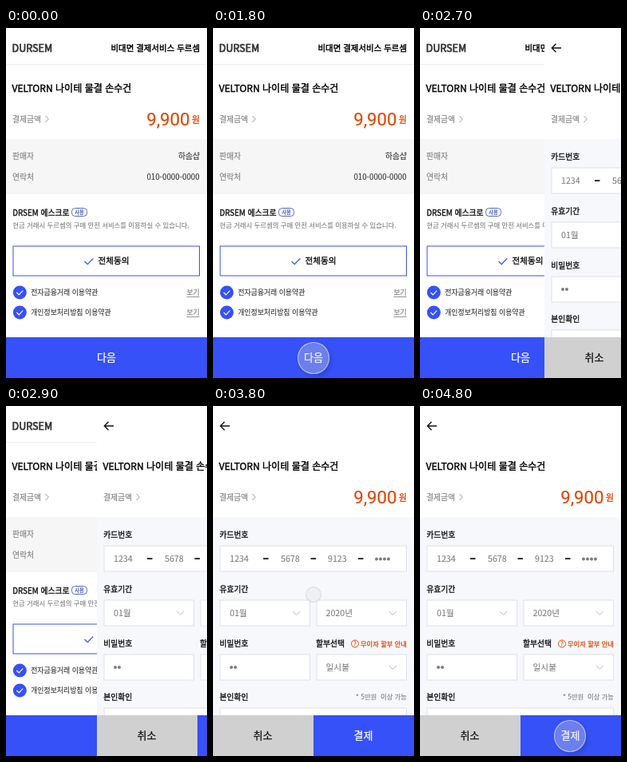
These frames come from a looping animation (252 px wide and 438 px high, 6.3 s). An HTML page:

```html
<!DOCTYPE html>
<html lang="ko">
<head>
<meta charset="utf-8">
<title>결제</title>
<style>
html, body { margin: 0; width: 100%; height: 100%; overflow: hidden; background: #fff; }
svg { display: block; position: absolute; left: 0; top: 0; }
text { font-family: "Noto Sans CJK KR", "Noto Sans CJK", "Noto Sans KR", sans-serif; white-space: pre; }
.price { font-family: Roboto, sans-serif; }
#touch {
  position: absolute; box-sizing: border-box; border-radius: 50%;
  background: rgba(223, 223, 223, .32); border: 1px solid rgba(213, 213, 218, .85);
}
</style>
</head>
<body>
<svg id="stage" width="252" height="438" viewBox="0 0 252 438"></svg>
<div id="touch"></div>
<script>
const BLUE = '#3551f7', ORANGE = '#e24605', DARK = '#111', GREY = '#7c7c7c', LINE = '#e0e1e6';

// Text whose visual middle sits at cy; bold is an outline width.
const text = (x, cy, str, size, color = DARK, { bold = .1, anchor = 'start', cls = '' } = {}) =>
  `<text x="${x}" y="${cy + size * .37}" font-size="${size}" fill="${color}" stroke="${color}" ` +
  `stroke-width="${bold}" text-anchor="${anchor}" class="${cls}">${str}</text>`;
const rect = (x, y, w, h, fill, stroke = 'none', rx = 0) =>
  `<rect x="${x}" y="${y}" width="${w}" height="${h}" rx="${rx}" fill="${fill}" stroke="${stroke}"/>`;
const path = (d, color, width = 1) =>
  `<path d="${d}" fill="none" stroke="${color}" stroke-width="${width}"/>`;
const dot = (x, y, r, fill) => `<circle cx="${x}" cy="${y}" r="${r}" fill="${fill}"/>`;

const right = { anchor: 'end' };
const label = (x, cy, str) => text(x, cy, str, 9.8, DARK, { bold: .35 });
const value = (x, cy, str) => text(x, cy, str, 10.7, GREY);
const dots = (x, y, n) => Array.from({ length: n }, (_, i) => dot(x + 5 * i, y, 2, GREY)).join('');
const field = (x, y, w) => rect(x + 1, y + 1, w - 1.5, 32, '#fff', LINE);
const arrowDown = (x, y) => path(`M${x} ${y - 2}l4.5 4.5 4.5-4.5`, '#bbb');
const footerText = (x, str, color) => text(x, 412.6, str, 13, color, { bold: .25, anchor: 'middle' });

const summary =
  text(7.5, 76, 'VELTORN 나이테 물결 손수건', 12.05, '#000', { bold: .4 }) +
  text(8, 114, '결제금액', 9.8, GREY) +
  path('M49.5 110l3.8 4-3.8 4', '#999') +
  text(230.5, 113.5, '9,900', 22.2, ORANGE, { bold: .15, anchor: 'end', cls: 'price' }) +
  text(243, 115, '원', 10.8, ORANGE, { bold: .3, anchor: 'end' });

const term = (y, str) =>
  dot(17.3, y, 8.5, BLUE) + path(`M13.4 ${y}l2.8 2.8 5-5.2`, '#fff', 1.2) +
  text(31.2, y - .4, str, 8.9, '#333') + text(242.8, y - .4, '보기', 8.9, GREY, right) +
  path(`M226.5 ${y + 5.5}h16`, GREY, .8);

const order =
  rect(0, 0, 252, 438, '#fff') +
  text(7.5, 25, 'DURSEM', 12.6, '#333', { bold: .7 }) +
  text(243, 25.3, '비대면 결제서비스 두르셈', 10.45, '#000', { bold: .4, anchor: 'end' }) +
  rect(0, 45, 252, 1, '#eee') +
  summary +
  rect(0, 139, 252, 69, '#f6f6f6') +
  text(8, 160, '판매자', 9.8, GREY) + text(243, 160, '하솜샵', 9.8, '#333', right) +
  text(8, 186, '연락처', 9.8, GREY) + text(242.7, 186, '010-0000-0000', 9.75, '#333', right) +
  label(8.3, 231, 'DRSEM 에스크로') +
  rect(82.5, 225.5, 19, 10, '#fff', '#5468c4', 4) +
  text(92, 230.5, '사용', 6.3, '#3a50b8', { bold: .2, anchor: 'middle' }) +
  text(8.3, 247.2, '현금 거래시 두르셈의 구매 안전 서비스를 이용하실 수 있습니다.', 8.38, GREY) +
  rect(9, 273, 233.5, 37, '#fff', BLUE) +
  path('M98.5 292l3.8 3.6 7-7.2', BLUE, 1.3) +
  text(115.6, 291.5, '전체동의', 10.6, DARK, { bold: .35 }) +
  term(331, '전자금융거래 이용약관') +
  term(356, '개인정보처리방침 이용약관') +
  rect(0, 387, 252, 51, BLUE) + footerText(126, '다음', '#fff');

const card =
  rect(0, 0, 252, 438, '#fff') +
  path('M21 25H9.5M14.5 19.8L9.3 25l5.2 5.2', '#111', 1.4) +
  summary +
  rect(0, 139, 252, 248, '#f7f8fc') +
  label(8.3, 161.3, '카드번호') + field(8, 174, 235) +
  ['1234', '5678', '9123'].map((s, i) =>
    value([21, 85, 144][i], 191, s) + rect(63 + 59.5 * i, 190, 6.5, 2, '#333')).join('') +
  dots(205, 191.5, 4) +
  label(8.3, 229.3, '유효기간') +
  field(8, 242, 114) + value(21, 259, '01월') + arrowDown(100, 259) +
  field(129, 242, 114) + value(141.5, 259, '2020년') + arrowDown(221, 259) +
  label(8.3, 297.3, '비밀번호') + field(8, 310, 114) + dots(23, 327, 2) +
  label(129, 297.3, '할부선택') +
  `<circle cx="178" cy="297.5" r="4.5" fill="none" stroke="${ORANGE}"/>` +
  text(178, 297.5, '?', 7, ORANGE, { bold: .2, anchor: 'middle' }) +
  text(243, 297.5, '무이자 할부 안내', 8.3, ORANGE, { bold: .25, anchor: 'end' }) +
  field(129, 310, 114) + value(141.5, 327, '일시불') + arrowDown(221, 327) +
  label(8.3, 364.3, '본인확인') + text(243, 364, '* 5만원  이상 가능', 8.35, GREY, right) +
  field(8, 377, 235) +
  rect(0, 387, 126, 51, '#d0d0d0') + footerText(62.5, '취소', DARK) +
  rect(126, 387, 126, 51, BLUE) + footerText(188.5, '결제', '#fff');

const stage = document.getElementById('stage'), touch = document.getElementById('touch');
stage.innerHTML = `<g>${order}</g><g id="card">${card}</g>`;
const cardPage = document.getElementById('card');

// Start time, left edge of the card page, then touch x, y, radius and shadow offset.
const STEPS = [
  [0, 252],
  [1000, 252, 126, 236, 10, 0], [1200, 252, 126, 236, 15, 0], [1400, 252, 126, 236, 20, 3],
  [1600, 252, 126, 320, 20, 3], [1800, 252, 126, 413, 20, 3],
  [2000, 252, 126, 413, 20, 1], [2200, 252, 126, 413, 20, 3],
  [2700, 156], [2900, 114], [3100, 53], [3300, 0],
  [3800, 0, 126, 236, 10, 0], [4000, 0, 126, 236, 15, 0], [4200, 0, 126, 236, 20, 3],
  [4400, 0, 156, 321, 20, 3], [4600, 0, 188, 413, 20, 1], [4800, 0, 188, 413, 20, 3],
];

function draw() {
  const time = performance.now() % 6300;
  const [, left, x = 0, y = 0, r = 0, shade = 0] = STEPS.filter(s => s[0] <= time).pop();
  cardPage.setAttribute('transform', `translate(${left})`);
  Object.assign(touch.style, {
    display: r ? 'block' : 'none',
    left: x - r + 'px', top: y - r + 'px', width: 2 * r + 'px', height: 2 * r + 'px',
    boxShadow: shade ? `${shade}px ${shade}px ${shade * 1.4}px rgba(0,0,0,.12)` : 'none',
  });
  requestAnimationFrame(draw);
}
draw();
</script>
</body>
</html>
```
